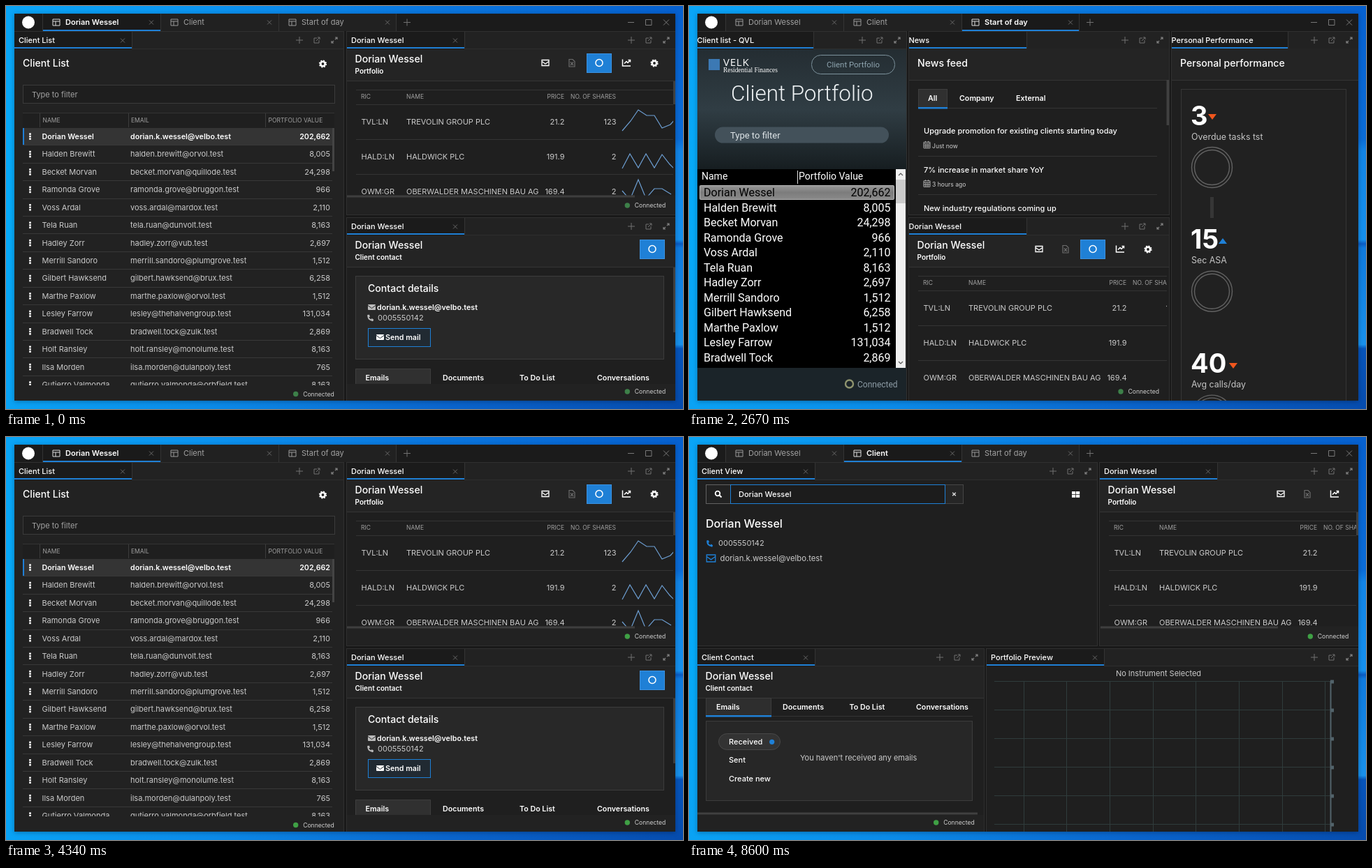
Recreate the animation shown at these times as an HTML page. Size 969 px wide and 578 px high, loop 8.67 s.

```html
<!DOCTYPE html>
<html lang="en">
<head>
<meta charset="utf-8">
<title>Desktop workspace</title>
<style>
html, body { margin: 0; width: 100%; height: 100%; overflow: hidden; background: #0a78dc; }
#stage { display: block; width: 969px; height: 578px; --dot: #3fa045; }
#stage.dim { --dot: #3d8049; }
text { font: 500 11px Inter, "Open Sans", sans-serif; fill: #fff; white-space: pre; }
.reg { font-weight: 400; fill: #cbcbcb; }
.bold { font-weight: 600; font-size: 10.7px; }
.mute { font-weight: 400; fill: #a2a2a2; }
.h { font-size: 14.1px; }
.h2 { font-size: 16px; }
.sub { font-size: 10px; font-weight: 600; }
.col { font-size: 8.5px; font-weight: 400; fill: #a0a0a0; }
.tiny { font-size: 8.6px; font-weight: 400; fill: #cfcfcf; }
.big { font-size: 38px; font-weight: 700; }
.lab { font-size: 12.4px; font-weight: 400; fill: #c4c4c4; }
.rob { font: 400 16px Roboto, sans-serif; }
.end { text-anchor: end; }
.mid { text-anchor: middle; }
.scene, .caret, .focus { display: none; }
.a .sa, .b .sb, .c .sc, .caretOn .caret, .focusOn .focus { display: inline; }
.raw .tab text { transform: translateX(-6.5px); }
.raw .tab path { display: none; }
.dot { fill: var(--dot); }
.window { filter: drop-shadow(0 1px 3px rgba(0, 0, 0, .3)); }
</style>
</head>
<body>
<svg id="stage" viewBox="0 0 969 578" xmlns="http://www.w3.org/2000/svg"></svg>
<script>
const BLUE = '#1f80d6', LINE = '#343434', BODY = '#1f1f1f', HEAD = '#242424';

const T = (x, y, s, cls = '', more = '') => `<text x="${x}" y="${y}" class="${cls}" ${more}>${s}</text>`;
const R = (x, y, w, h, fill, more = '') => `<rect x="${x}" y="${y}" width="${w}" height="${h}" fill="${fill}" ${more}/>`;
const box = (x, y, w, h, fill, stroke, rx = 0) => R(x + .5, y + .5, w - 1, h - 1, fill, `stroke="${stroke}" rx="${rx}"`);
const P = (d, color, w = 1, fill = 'none') => `<path d="${d}" stroke="${color}" stroke-width="${w}" fill="${fill}"/>`;
const C = (x, y, r, fill, stroke = 'none', w = 1) =>
  `<circle cx="${x}" cy="${y}" r="${r}" fill="${fill}" stroke="${stroke}" stroke-width="${w}"/>`;
const hline = (x1, x2, y, color = LINE) => R(x1, y, x2 - x1, 1, color);
const vline = (x, y1, y2, color = LINE) => R(x, y1, 1, y2 - y1, color);
const clip = (x, y, w, h, inner) =>
  `<svg x="${x}" y="${y}" width="${w}" height="${h}" viewBox="${x} ${y} ${w} ${h}">${inner}</svg>`;
const grad = (id, dir, stops) => `<linearGradient id="${id}" ${dir}>` +
  stops.map(([o, c]) => `<stop offset="${o}" stop-color="${c}"/>`).join('') + '</linearGradient>';

// Icons
const cross = (x, y, r, color, w = 1) =>
  P(`M${x - r} ${y - r}l${2 * r} ${2 * r}m0 ${-2 * r}l${-2 * r} ${2 * r}`, color, w);
const plus = (x, y) => P(`M${x - 5} ${y}h10m-5 -5v10`, '#707070');
const popOut = (x, y) => P(`M${x} ${y - 3}h-4v7h7v-4M${x - 1} ${y + 1}l5 -5m-3 0h3v3`, '#707070');
const expand = (x, y) => P(`M${x + 1} ${y - 1}l3 -3m-3 0h3v3M${x - 1} ${y + 1}l-3 3m3 0h-3v-3`, '#808080', 1.2);
const layout = (x, y, color) => P(`M${x - 5} ${y - 4.5}h10v9h-10zm0 3h10m-6 0v6`, color);
const mail = (x, y, color = '#fff', s = 1) =>
  P(`M${x - 5 * s} ${y - 4 * s}h${10 * s}v${8 * s}h${-10 * s}zm0 ${2 * s}l${5 * s} ${3.5 * s}l${5 * s} ${-3.5 * s}`, color, 1.3);
const mailFull = (x, y, color, seam) => R(x - 5.5, y - 4, 11, 8, color, 'rx="1"') +
  P(`M${x - 5.5} ${y - 2.5}l5.5 4l5.5 -4`, seam);
const phone = (x, y, color) => P(`M${x - 3.5} ${y - 4}q-1.5 7 7 8`, color, 2) +
  P(`M${x - 3.5} ${y - 4}l1.3 3M${x + 3.5} ${y + 4}l-2.7 -1.7`, color, 2.8);
const sheet = (x, y) => P(`M${x - 4} ${y - 5}h5l3 3v7.5h-8zM${x - 2} ${y - 1}l4 4.5m0 -4.5l-4 4.5`, '#6c6c6c', 1.2);
const chart = (x, y) => P(`M${x - 5.5} ${y - 5}v9.5h11.5`, '#fff', 1.5) +
  P(`M${x - 3} ${y + 1}l3 -3l2 2l3.5 -4m-3 0h3v3`, '#fff', 1.5);
const gear = (x, y) => C(x, y, 3.2, 'none', '#fff', 2.6) +
  `<circle cx="${x}" cy="${y}" r="4.8" fill="none" stroke="#fff" stroke-width="1.6" stroke-dasharray="2 1.77"/>`;
const ring = (x, y) => box(x - 18, y - 14, 36, 28, BLUE, '#3c92e0') + C(x, y - .5, 5, 'none', '#fff', 1.5);
const calendar = (x, y) => P(`M${x} ${y + 1.5}h9v8.5h-9zm0 2.5h9m-6 0v6m3 -6v6m-6 -3h9M${x + 2.5} ${y}v2m4 -2v2`, '#bbb', .9);
const arrow = (x, y, up) => up ? P(`M${x} ${y + 9}h12l-6 -8z`, 'none', 0, BLUE) : P(`M${x} ${y}h12l-6 8z`, 'none', 0, '#f0561d');

// Invented clients: name, mail host, portfolio value
const ME = 'Dorian Wessel', MAIL = 'dorian.k.wessel@velbo.test', TEL = '0005550142';
const clients = [
  [ME, MAIL, '202,662'],
  ['Halden Brewitt', 'orvol.test', '8,005'],
  ['Becket Morvan', 'quillode.test', '24,298'],
  ['Ramonda Grove', 'bruggon.test', '966'],
  ['Voss Ardal', 'mardox.test', '2,110'],
  ['Tela Ruan', 'dunvolt.test', '8,163'],
  ['Hadley Zorr', 'vub.test', '2,697'],
  ['Merrill Sandoro', 'plumgrove.test', '1,512'],
  ['Gilbert Hawksend', 'brux.test', '6,258'],
  ['Marthe Paxlow', 'orvol.test', '1,512'],
  ['Lesley Farrow', 'lesley@thehalvengroup.test', '131,034'],
  ['Bradwell Tock', 'zulk.test', '2,869'],
  ['Holt Ransley', 'monolume.test', '8,163'],
  ['Ilsa Morden', 'dulanpoly.test', '765'],
  ['Gutierro Valmonda', 'orbfield.test', '8,163']
];
const mailOf = ([name, host]) => host.includes('@') ? host : name.toLowerCase().replace(' ', '.') + '@' + host;

const stocks = [
  ['TVL:LN', 'TREVOLIN GROUP PLC', '21.2', '123', '882,179 894,165 905,149 917,157 928,157 939,175 951,170 957,163'],
  ['HALD:LN', 'HALDWICK PLC', '191.9', '2', '882,233 893,212 905,232 916,212 928,232 939,213 950,227 957,234'],
  ['OWM:GR', 'OBERWALDER MASCHINEN BAU AG', '169.4', '2', '882,265 893,278 905,249 916,276 928,262 939,262 952,270']
];

function desktop() {
  return '<defs>' +
    grad('top', '', [[0, '#0aa4f6'], [.3, '#0b93f0'], [.6, '#0a78e0'], [1, '#0660cf']]) +
    grad('low', '', [[0, '#0aa2f4'], [.3, '#0b8ae8'], [.65, '#0a64cc'], [1, '#064cae']]) +
    grad('left', 'x2="0" y2="1"', [[0, '#0aa4f6'], [.5, '#06aaf8'], [1, '#0aa2f4']]) +
    grad('right', 'x2="0" y2="1"', [[0, '#0660cf'], [.33, '#0a6cd8'], [.36, '#1284e6'], [.58, '#1590ee'],
      [.59, '#0a5cc4'], [.6, '#0f7ade'], [.84, '#1890ea'], [.85, '#0654ba'], [1, '#064cae']]) +
    grad('slate', 'x2="0" y2="1"', [[0, '#242d32'], [.5, '#303d44'], [1, '#161d20']]) +
    grad('steel', 'x2="0" y2="1"', [[0, '#979797'], [.5, '#7c7c7c'], [1, '#8a8a8a']]) + '</defs>' +
    R(0, 0, 969, 12, 'url(#top)') + R(0, 565, 969, 13, 'url(#low)') +
    R(0, 0, 13, 578, 'url(#left)') + R(957, 0, 12, 578, 'url(#right)') +
    R(12, 11, 946, 555, '#191919', 'class="window"');
}

function appBar(active) {
  let s = R(12, 11, 946, 25, '#1b1b1b') + C(32, 23.5, 9, '#fff');
  [ME, 'Client', 'Start of day'].forEach((name, i) => {
    const x = 52 + i * 169, on = i === active;
    s += R(x, 11, 169, 25, on ? '#1a1a1a' : '#212121') + vline(x, 11, 36) +
      layout(x + 20, 23.5, on ? '#ddd' : '#999') + T(x + 33, 27.3, name, on ? 'bold' : 'mute', 'style="font-size:11px"') +
      cross(x + 156, 23.5, 3, '#666') + (on ? R(x + 1, 34, 168, 2, BLUE) : '');
  });
  return s + vline(558, 11, 36) + plus(574, 23.5) + P('M890 23.5h9M915.5 19.5h8.5v8h-8.5z', '#777') +
    cross(945, 23.5, 4, '#777');
}

// Docked panel with its tab strip
function panel(l, r, top, bottom, name, tabW = 168) {
  const y = top + 12;
  return box(l - 1, top - 1, r - l + 2, bottom - top + 2, BODY, '#303030') +
    R(l, top, r - l, 25, '#222') + hline(l, r, top + 24, '#2e2e2e') +
    R(l, top, tabW, 25, '#1b1b1b') + vline(l + tabW, top, top + 24) + R(l, top + 22, tabW, 2, BLUE) +
    `<g class="tab">${T(l + 6, y + 4, name)}${cross(l + tabW - 13, y + .5, 3, '#666')}</g>` +
    plus(r - 63, y) + popOut(r - 38, y) + expand(r - 13, y);
}

const header = (l, r, top, name, sub) => R(l, top, r - l, 45, HEAD) + hline(l, r, top + 45) +
  (sub ? T(l + 11.5, top + 18.5, name, 'h') + T(l + 11.5, top + 35, sub, 'sub') : T(l + 12, top + 25.5, name, 'h'));
const connected = (x, y) => `<circle class="dot" cx="${x}" cy="${y}" r="3.7"/>` + T(x + 10.5, y + 3.2, 'Connected', 'tiny');

function portfolio(l, r, top, full) {
  const dx = l - 488, dy = top - 37, y = top + 44.5;
  let rows = hline(501, 960, 120) + hline(501, 960, 141) + T(508, 133.2, 'RIC', 'col') + T(573, 133.2, 'NAME', 'col') +
    T(799, 133.2, 'PRICE', 'col end') + T(808, 133.2, 'NO. OF SHARES', 'col');
  stocks.forEach(([ric, name, price, count, pts], i) => {
    const b = 169.8 + i * 50;
    rows += T(508.5, b, ric, 'reg') + T(573, b, name, 'reg') + T(799.5, b, price, 'reg end') + T(873.5, b, count, 'reg end') +
      hline(501, 960, 191 + i * 50) + `<polyline points="${pts}" fill="none" stroke="#6d9fd3" stroke-width="1.2"/>`;
  });
  const low = top > 100;
  const head = header(l, r, top + 25, ME, 'Portfolio');
  const icons = full
    ? mail(r - 186, y) + sheet(r - 148, y) + ring(r - 109, y + .5) + chart(r - 70, y) + gear(r - 30, y + .5)
    : mail(r - 111, y) + sheet(r - 73, y) + chart(r - 34, y);
  return panel(l, r, top, low ? 566 : 299, ME) + head + icons +
    clip(l, top + 71, r - l - 3, low ? 170 : 164, `<g transform="translate(${dx} ${dy})">${rows}</g>`);
}

const tabs = (y, names) => names.map(([x, s]) => T(x, y, s, 'bold')).join('');

function sceneA() {
  let s = appBar(0) + panel(12, 483, 37, 566, 'Client List') + R(12, 62, 471, 504, '#222') +
    T(24, 87.3, 'Client List', 'h') + gear(453.5, 83) + box(24, 113, 447, 27, '#1e1e1e', '#3b3b3b') +
    T(37, 130.5, 'Type to filter', 'mute') + R(24, 153, 446, 22, '#1f1f1f') + hline(24, 470, 153) +
    [48, 175, 371].map(x => vline(x, 154, 174, '#3c3c3c')).join('') +
    T(52.5, 167.2, 'NAME', 'col') + T(179, 167.2, 'EMAIL', 'col') + T(375.5, 167.2, 'PORTFOLIO VALUE', 'col');
  let rows = R(24, 175, 443, 25, '#343434') + R(24, 175, 2, 25, BLUE);
  clients.forEach((c, i) => {
    const y = 187 + i * 25.43, cls = i ? 'reg' : 'bold';
    rows += [-3.5, 0, 3.5].map(d => R(33.2, y + d - 1.2, 2.6, 2.6, '#fff')).join('') +
      T(51.5, y + 4, c[0], cls) + T(178, y + 4, mailOf(c), cls) + T(464, y + 4, c[2], cls + ' end') +
      hline(24, 467, Math.round(y + 12.3), '#383838');
  });
  s += clip(24, 174, 446, 370, rows) + R(467, 175, 3, 62, '#444') + connected(414.7, 556.5);

  s += portfolio(488, 958, 37, true) + R(955, 108, 3, 33, '#404040') + R(488, 271.5, 470, 27.5, '#222') +
    R(488, 271.5, 412, 3, '#3e3e3e') + connected(889.3, 286);

  s += panel(488, 958, 304, 566, ME) + header(488, 958, 329, ME, 'Client contact') + ring(925, 349) +
    box(500, 387, 442, 120, '#282828', '#3c3c3c') + T(518, 410.3, 'Contact details', 'h') +
    mailFull(523.5, 432, '#bbb', '#282828') + T(531, 436, MAIL, 'bold') + phone(522, 447, '#bbb') +
    T(532, 451, TEL, 'reg') + box(518, 462, 90, 27, '#212a32', BLUE) + mailFull(535.5, 475, '#fff', '#212a32') +
    T(543, 479, 'Send mail', 'bold') + R(500, 520, 108, 22, '#303030') + P('M500.5 542v-21.5h107v21.5', '#3e3e3e') +
    tabs(537.2, [[514.5, 'Emails'], [625, 'Documents'], [735, 'To Do List'], [846, 'Conversations']]) +
    R(955, 375, 3, 93, '#404040') + R(488, 542, 470, 24, '#222') + connected(889.3, 553);
  return s;
}

function sceneB() {
  let s = appBar(1) + panel(12, 584, 37, 299, 'Client View') +
    box(24, 68, 369, 28, '#1c1c1c', '#464646') + box(24, 68, 36, 28, '#222', '#626262') +
    box(366, 68, 27, 28, '#262626', '#464646') + C(41, 81, 3.3, 'none', '#fff', 1.8) + P('M43.5 83.5l3 3', '#fff', 2) +
    T(71, 86.3, ME) + cross(379.5, 82, 2.3, '#ddd', 1.4) +
    `<g class="focus">${box(59, 68, 308, 28, 'none', BLUE)}</g><g class="caret">${R(71, 76, 1, 13, '#fff')}</g>` +
    [[548, 78], [554, 78], [548, 82.8], [554, 82.8]].map(([x, y]) => R(x, y, 5.2, 4, '#fff')).join('') +
    T(24, 129.8, ME, 'h2') + phone(30, 152.5, BLUE) + T(42, 156, TEL, 'reg') +
    mail(31.5, 174, BLUE, 1.25) + T(44.5, 178, MAIL, 'reg', 'style="font-size:11.3px"');

  s += portfolio(588, 958, 37, false) + R(955, 108, 3, 33, '#404040') + R(588, 271.5, 370, 27.5, '#222') +
    R(589, 271.5, 254, 3, '#3e3e3e') + connected(889.3, 286);

  s += panel(12, 422, 304, 566, 'Client Contact') + header(12, 422, 329, ME, 'Client contact') +
    hline(24, 406, 400) + box(24, 374, 94, 27, '#2e2e2e', '#3c3c3c') + R(24, 399, 94, 2.5, BLUE) +
    tabs(391, [[39, 'Emails'], [134, 'Documents'], [229.5, 'To Do List'], [325, 'Conversations']]) +
    box(24, 407, 382, 115, '#272727', '#3c3c3c') + box(42, 425, 89, 24, '#333', '#484848', 12) + C(118.7, 437.3, 3.6, BLUE) +
    T(57, 441, 'Received') + T(57, 467, 'Sent') + T(57, 493.5, 'Create new') +
    T(159, 464, "You haven't received any emails", 'reg') + R(12, 542, 410, 24, '#222') +
    R(12, 538.5, 401, 3, '#404040') + connected(353.7, 553);

  s += panel(426, 958, 304, 566, 'Portfolio Preview') + T(672, 342.5, 'No Instrument Selected', 'reg mid');
  for (let i = 0; i < 8; i++) s += vline(Math.round(478.5 + i * 61.7), 350, 566, '#2f3c3c');
  for (let i = 0; i < 6; i++) s += hline(437, 918, 350 + i * 41, '#2f3c3c') + R(918, 348.5 + i * 41, 5, 5, '#52636b');
  return s + R(917.5, 350, 2, 216, '#52636b');
}

function sceneC() {
  let s = appBar(2) + panel(12, 311, 37, 566, 'Client list - QVL', 166) +
    R(12, 62, 299, 173, 'url(#slate)') + R(12, 519, 299, 47, '#1b2429') + R(28, 76, 16, 16, '#3c79b4') +
    T(49, 86, 'VELK', '', 'style="font:400 15px \'Open Sans\',sans-serif;letter-spacing:.8px"') +
    T(49, 95, 'Residential Finances', '', 'style="font:400 9.4px \'Liberation Serif\',serif"') +
    box(175, 70, 120, 28, 'none', '#7d929c', 13) + T(235, 88.2, 'Client Portfolio', 'rob mid', 'style="font-size:11.4px;fill:#8fa5b0"') +
    T(60, 136, 'Client Portfolio', 'rob', 'style="font-size:31.4px;font-weight:300;fill:#eef2f4"') +
    R(37, 173.5, 249, 23, '#43515a', 'rx="11.5"') + T(59, 189.7, 'Type to filter', 'rob', 'style="font-size:13px;fill:#dfe5e8"') +
    R(12, 234, 284, 285, '#000') + T(18, 249, 'Name', 'rob', 'style="font-size:14px"') + vline(155, 236, 255, '#ddd') +
    T(157, 249, 'Portfolio Value', 'rob', 'style="font-size:14px"') + box(15, 257, 279, 21, 'url(#steel)', '#b4b4b4', 1);
  let names = '', values = '';
  clients.slice(0, 12).forEach((c, i) => {
    const y = 273 + i * 21.5, more = i ? '' : 'style="fill:#000"';
    names += T(21, y, c[0], 'rob', more);
    values += T(288.5, y, c[2], 'rob end', more);
  });
  s += clip(12, 256, 138, 263, names) + values + R(296, 234, 14, 285, '#f0f0f0') + R(296, 249, 14, 34, '#cbcbcb') +
    P('M300 243l3 -3l3 3M300 510l3 3l3 -3', '#555', 1.2) +
    C(229.5, 542, 5.5, 'none', '#8f946e', 2.4) + T(241, 546.5, 'Connected', 'rob', 'style="font-size:12px;fill:#8d9ca5"');

  let news = '';
  [['Upgrade promotion for existing clients starting today', 'Just now'], ['7% increase in market share YoY', '3 hours ago'],
    ['New industry regulations coming up', '']].forEach(([title, age], i) => {
    const y = 183.3 + i * 55.5;
    news += T(336, y, title) +
      (age ? calendar(336, y + 10.5) + T(348, y + 20.5, age, 'tiny') + hline(328, 670, Math.round(y + 31.5)) : '');
  });
  s += panel(315, 687, 37, 299, 'News') + header(315, 687, 61, 'News feed') + hline(328, 670, 146) +
    box(328, 119, 42, 28, '#303030', '#3e3e3e') + R(328, 145, 42, 2.5, BLUE) +
    tabs(136.3, [[342, 'All'], [387, 'Company'], [468, 'External']]) + clip(315, 150, 368, 149, news) +
    R(683.5, 106, 3.5, 65, '#404040');

  s += portfolio(315, 687, 304, true) + R(315, 542, 372, 24, BODY) + connected(618, 553);

  s += panel(691, 958, 37, 566, 'Personal Performance', 166) + header(691, 958, 61, 'Personal performance') +
    box(704, 119, 237, 460, '#212121', '#363636') + R(746, 274, 5, 30, '#363636');
  [['3', 'Overdue tasks tst', 743, 155], ['15', 'Sec ASA', 758, 332], ['40', 'Avg calls/day', 773, 512]].forEach(([n, label, x, y], i) => {
    const d = i * 177.8;
    s += T(718, 170.5 + d, n, 'big') + arrow(x, y, i === 1) + T(719, 191.5 + d, label, 'lab') +
      C(748.5, 231.5 + d, 29, 'none', '#626262', 1.4) + C(748.5, 231.5 + d, 25, 'none', '#626262', 1.4);
  });
  return s;
}

const stage = document.getElementById('stage');
const scene = (id, inner) => `<g class="scene ${id}">${clip(12, 11, 946, 555, inner)}</g>`;
stage.innerHTML = desktop() + scene('sa', sceneA()) + scene('sb', sceneB()) + scene('sc', sceneC());

const LOOP = 8670;
const steps = [
  [0, 'a dim'], [1200, 'b'], [2600, 'b caretOn'], [2670, 'c dim raw'], [2740, 'c dim'],
  [4340, 'a'], [5870, 'b raw'], [5940, 'b'], [6000, 'b focusOn'],
  [6070, 'b focusOn caretOn'], [6470, 'b focusOn'], [7010, 'b focusOn caretOn'],
  [7540, 'b focusOn'], [8000, 'b focusOn caretOn'], [8600, 'b focusOn']
];
const start = performance.now();
let shown = '';

function draw() {
  const t = Math.max(0, performance.now() - start) % LOOP;
  const state = steps.filter(([at]) => at <= t).pop()[1];
  if (state !== shown) stage.setAttribute('class', shown = state);
  requestAnimationFrame(draw);
}
draw();
</script>
</body>
</html>
```
